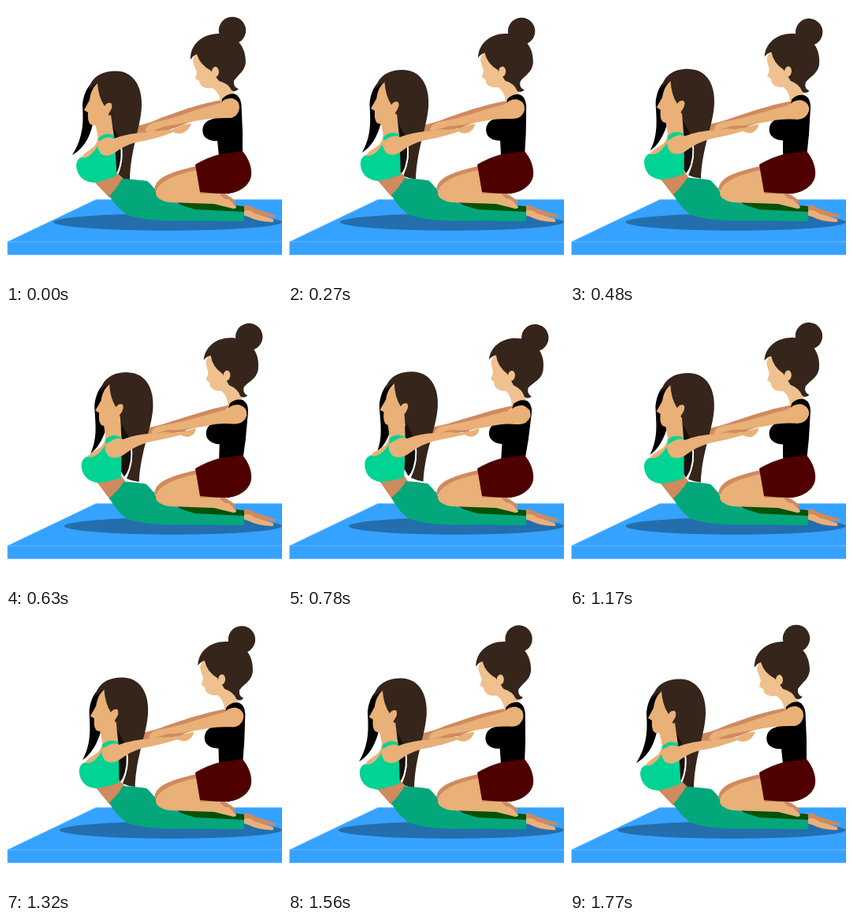
An HTML page that plays this animation: 350 by 350 pixels, repeating every 1.8 s.

```html
<!DOCTYPE html>
<html lang="en">
<head>
<meta charset="utf-8">
<title>Partner stretch</title>
<style>
  html, body { margin: 0; width: 100%; height: 100%; overflow: hidden; background: #fff; }
  svg { display: block; width: 350px; height: 350px; }
  .hair { fill: #35251b; }
  .skin { fill: #e9b077; }
  .pale { fill: #efc18f; }
  .shade { fill: #cf8a5f; }
  .top { fill: #00d394; }
  .pants { fill: #04a77a; }
  .far { fill: #055208; }
  .shorts { fill: #4f0000; }
  .mat { fill: #36a2ff; stroke: #70bcff; stroke-width: .7; }
  .gap { fill: none; stroke: #fff; stroke-width: 1.8; }
</style>
</head>
<body>
<svg viewBox="0 0 350 350">
  <path class="mat" d="M2 299L114 245.500H351V299Z"/>
  <path class="mat" d="M2 299H351V315.500H2Z"/>
  <ellipse id="shadow" cy="274" ry="10.700" fill="#246eae"/>

  <!-- far arms -->
  <path class="shade" d="M280 118Q255 122 230 130L196 142Q182 149 166 152L164 162L190 163L245 143Z"
    data-to="M290 120Q265 125 240 133L213 141Q195 147 175 150L174 161L200 160L255 146Z"/>

  <!-- front figure: hair behind the body -->
  <g class="lean-head">
    <path d="M118 93C104 97 98 112 97 126C98 145 99 165 84 189C97 182 106 168 110 150L122 120Z"
      data-to="M118 93C104 97 99 112 98 126C99 145 105 165 97 186C107 177 111 166 116 150L122 120Z"/>
    <path fill="#15100c" d="M124 128L142 160L147 190Q145 206 138 215L126 196L122 160Z"/>
    <path class="hair" d="M107 99C113 87 126 82 140 82.500C163 83 173 104 172 127C171 154 158 180 157 221Q148 220 141 217C147 202 150 190 145 172C141 160 133 150 128 138L117 115L116 98Q110 100 104 108Z"/>
    <path class="gap" d="M145 172Q150 194 140 217"/>
  </g>
  <path class="shade" d="M111 222L140 211L149 219L131 243Z" data-to="M114 214L146 208L152 217L132 240Z"/>
  <g class="lean-body">
    <path class="skin" d="M112 146L133 138L137 166L122 190L95 202Q92 194 100 187L112 178Q118 170 116 162Z"/>
    <path class="top" d="M117 168Q125 159 137 164L139 190L140.500 215Q127 221 112 224Q97 223 92 213C87 203 89 195 95 192C103 194 109 188 113 182Q119 175 117 168Z"/>
  </g>
  <g class="lean-head">
    <path class="skin" d="M116 98C109 104 107 112 106 119L99 132L104 135Q103 146 107 150Q112 153 119 149L132 152L130 137Q137 127 133 123Q128 122 125 127Q117 115 116 98Z"/>
  </g>

  <!-- front figure: legs -->
  <path class="shade" d="M301 253Q308 252 316 257L341 265Q344 268 339 268L303 264Z"/>
  <path class="skin" d="M301 260Q309 257 315 263L338 270Q342 274 336 274Q318 273 309 268L301 265Z"/>
  <path class="far" d="M184 230L240 249L263 250L302 254V265L238 262Z"/>
  <path class="pants" d="M147 219Q165 220 179 222Q186 227 194 241Q212 250 240 258L302 261V273L245 272.500C205 273 170 272 152 264Q140 255 131 241Q141 230 147 219Z"
    data-to="M150 217Q165 218 177 220Q184 226 194 241Q212 250 240 258L302 261V273L245 272.500C205 273 170 272 152 264Q140 255 131 238Q143 228 150 217Z"/>

  <!-- back figure: legs -->
  <path class="shade" d="M246 202Q218 208 205 214Q189 221 188 233L230 237L271 234Q280 239 291 247Q293 250 287 250L230 243Z"/>
  <path class="skin" d="M246 207Q217 213 205 220Q190 228 190 238Q191 246 207 249Q238 250 264 251L288 257Q294 257 291 253L282 245Q276 246 271 238L246 238Z"/>

  <!-- back figure: body and head -->
  <g class="pull">
    <path class="pale" d="M258 99L269 94L284 96L290 114L272 122Q271 110 262 104Z"/>
    <path d="M274 118Q281 110 290 111.500Q297 114 298.500 125L300 160V190L270 190L268 171Q258 172 252 166C247 159 249 149 257 145L271 140Z"/>
    <path class="pale" d="M244 57Q237 64 237 71L242 84L240 92L245 95Q246 103 254 104Q262 105 268 101L277 92L267 65Z"/>
    <circle class="hair" cx="287" cy="31" r="17.200"/>
    <path class="hair" d="M234 68C233 49 249 35 270 35C292 36 304 51 304 71C303 83 295 86 289 95Q288 103 295 105Q291 110 286 107Q282 98 270 95L264 87Q261 85 260 82Q246 75 242 61Q237 63 234 68Z"/>
    <ellipse class="pale" cx="265.500" cy="83.500" rx="4.500" ry="6.500"/>
  </g>
  <path class="shorts" d="M240 201Q255 192 271 188L300 184C308 194 312 204 311 215C309 228 296 236 282 238Q264 238 246 236Z"/>

  <!-- near arms -->
  <path class="skin" d="M272 123Q278 116 287 117Q297 120 296 130Q293 143 281 142Q260 142 245 145L206 152Q194 154 189 159Q181 162 176 158Q179 149 190 147Q211 143 235 134Q252 128 272 123Z"
    data-to="M282 127Q289 120 298 121Q309 125 307.500 135Q303 146 290 145Q272 143 255 148L218 153Q209 154 204 157Q196 161 187 157Q185 150 196 147Q217 144 240 138Q262 132 282 127Z"/>
  <path class="shade" d="M178 160Q196 155 214 155L222 151L205 152Z"
    data-to="M188 157Q208 152 230 156L230 153L206 152Z"/>
  <path class="skin" d="M124 168Q130 165 137 168Q156 161 180 160L206 157Q216 156 222 151L235 149Q232 158 224 161Q218 163 212 160Q190 169 164 173Q148 178 138 186Q128 193 120 187Q114 178 117 172Z"
    data-to="M138 164Q146 160 151 163Q166 157 186 156L206 155Q218 157 230 154L242 150Q243 157 236 160Q230 162 224 158Q205 162 186 166Q168 171 156 180Q144 190 133 185Q126 178 128 170Z"/>
</svg>
<script>
  const LOOP = 1800, STEP = 30, PEAK = 780, REST = 1770;
  const all = s => [...document.querySelectorAll(s)];
  const numbers = /-?\d+(\.\d+)?/g;
  const morphs = all('[data-to]').map(el => ({
    el, from: el.getAttribute('d'), to: el.dataset.to.match(numbers).map(Number)
  }));
  const shadow = document.getElementById('shadow');

  const move = (name, dx, dy, angle, pivot) => p => all('.' + name).forEach(el =>
    el.setAttribute('transform', `translate(${dx * p} ${dy * p}) rotate(${angle * p} ${pivot})`));
  const moves = [
    move('lean-head', 17, -4, 2, '145 150'),
    move('lean-body', 4, -3, 6, '140 240'),
    move('pull', 0.3, 2.5, 9.5, '290 188')
  ];

  function draw(p) {
    moves.forEach(m => m(p));
    for (const { el, from, to } of morphs) {
      let i = 0;
      el.setAttribute('d', from.replace(numbers, n => +n + (to[i++] - n) * p));
    }
    shadow.setAttribute('cx', 205 + 8.5 * p);
    shadow.setAttribute('rx', 145 - 8.5 * p);
  }

  // Pull back quickly, release a little slower.
  function frame() {
    const t = Math.floor(performance.now() % LOOP / STEP) * STEP;
    draw(t < PEAK ? t / PEAK : (REST - t) / (REST - PEAK));
    requestAnimationFrame(frame);
  }
  frame();
</script>
</body>
</html>
```
